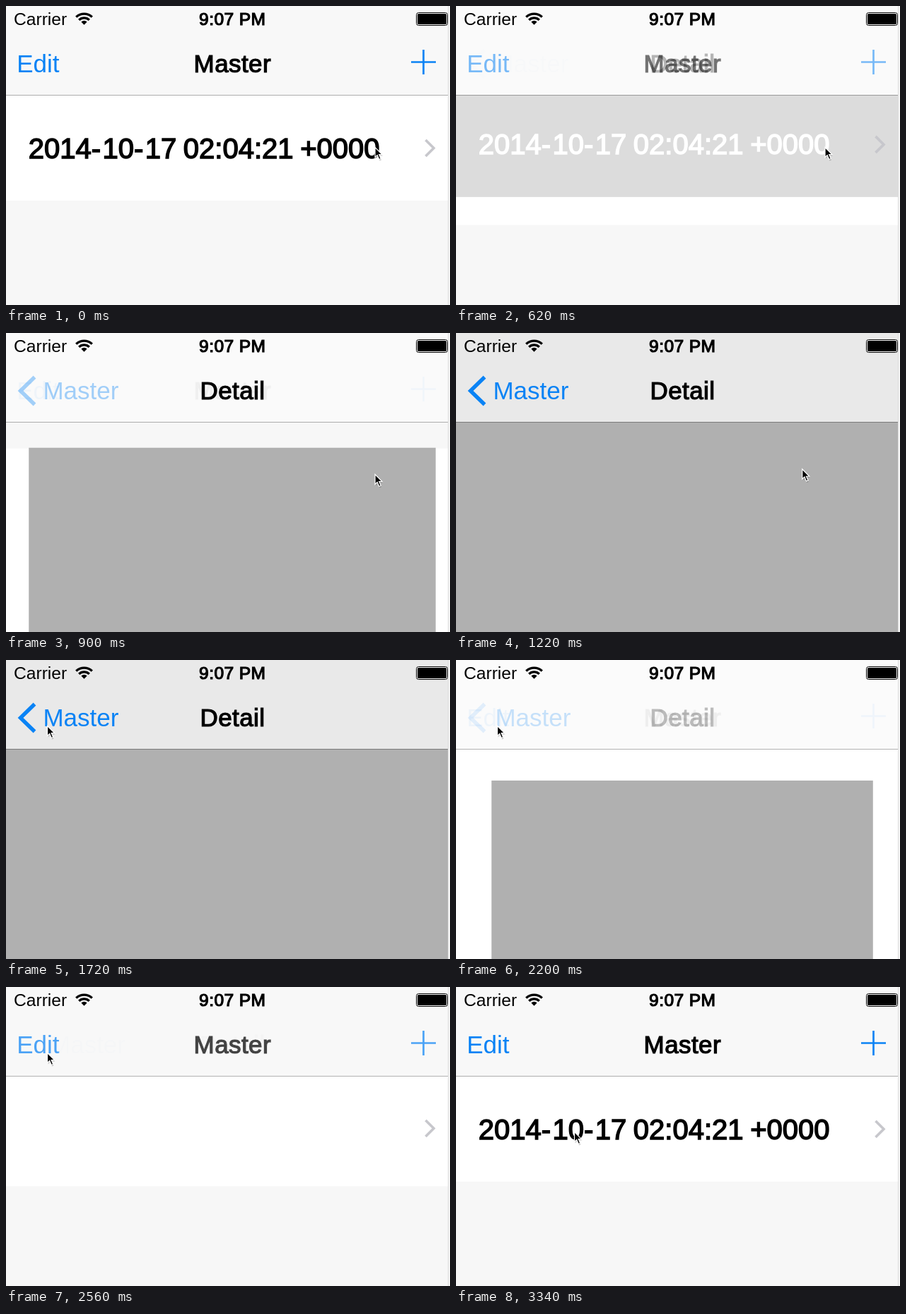
An HTML page that plays this animation: 628x424 px, repeating every 3.44 s.

```html
<!DOCTYPE html>
<html lang="en">
<head>
<meta charset="utf-8">
<title>Cell expand transition</title>
<style>
  html, body { margin: 0; width: 100%; height: 100%; overflow: hidden; background: #f7f7f7; }
  svg { display: block; width: 628px; height: 424px; }
  text { font-family: "Liberation Sans", Arial, sans-serif; white-space: pre; fill: currentColor; }
  /* Medium weight: regular outlines thickened a little */
  .medium { stroke: currentColor; stroke-width: 1.2px; letter-spacing: .4px; }
  .bar { font-size: 35px; }
  .status { font-size: 24.6px; }
  .stamp { font-size: 40px; letter-spacing: 0; word-spacing: -1.5px; stroke-width: 1.5px; }
  .dash { letter-spacing: 2.4px; }
  .mid { text-anchor: middle; }
  .blue { color: #0a83f5; }
  .line { fill: none; stroke: #0a83f5; }
</style>
</head>
<body>
<svg viewBox="0 0 628 424">
  <rect width="628" height="424" fill="#f7f7f7"/>

  <g id="master">
    <rect id="sheet" width="626" fill="#fff"/>
    <g id="cell">
      <rect id="cellBg" width="626" height="149"/>
      <text id="stamp" class="medium stamp" x="31.8" y="88.5">2014<tspan class="dash">-</tspan>10<tspan class="dash">-</tspan>17 02:04:21 +0000</text>
      <path d="M593.5 63 L605 74.5 L593.5 86" fill="none" stroke="#c7c7cc" stroke-width="3.6"/>
    </g>
  </g>
  <rect id="detail" fill="#b0b0b0"/>

  <rect id="nav" width="626" height="126"/>
  <rect y="126" width="626" height="1" fill="#000" opacity=".3"/>

  <text class="status" x="11" y="27">Carrier</text>
  <g fill="none" stroke="#000" stroke-width="3.2">
    <path d="M99.2 15.6 A16.3 16.3 0 0 1 121.8 15.6"/>
    <path d="M103.2 19.8 A10.4 10.4 0 0 1 117.8 19.8"/>
    <path d="M106.4 22.4 A5.8 5.8 0 0 1 114.6 22.4 L110.5 26.8 Z" fill="#000" stroke="none"/>
  </g>
  <text class="status medium mid" x="320.3" y="27" stroke-width=".9">9:07 PM</text>
  <rect x="580.5" y="9.5" width="44" height="18" rx="3" fill="#fff" stroke="#000"/>
  <rect x="582" y="11" width="41" height="15" rx="1.5"/>

  <g id="masterBar">
    <text class="bar blue" x="15.2" y="94">Edit</text>
    <path class="line" d="M573 79.5 H608 M590.5 62 V97" stroke-width="2.7"/>
  </g>
  <text id="masterTitle" class="bar medium mid" x="320.3" y="94">Master</text>
  <text id="detailTitle" class="bar medium mid" x="320.5" y="94">Detail</text>
  <path id="backArrow" class="line" d="M40.5 62.5 L20.5 82 L40.5 101.5" stroke-width="5.4"/>
  <text id="backLabel" class="bar blue" x="52.4" y="94">Master</text>

  <rect x="626" width="2" height="424" fill="#f6f6f6"/>
  <rect x="625" width="1" height="424" fill="#dcdcdc"/>

  <g id="cursor">
    <path d="M1 2 V16 L4 13 L6.500 19 L9 18 L6.500 12 H11 Z" opacity=".2"/>
    <path d="M0 0 V14 L3.200 11 L5.700 17 L8.200 16 L5.700 10.200 H10 Z" stroke="#fff" stroke-width="1.2"/>
  </g>
</svg>
<script>
  const LOOP = 3440;
  const PRESS = 320, TEXT_RESET = 2780, BACK_PRESS = 1840;
  const PUSH = { start: 557, zoom: 451, fade: 523 };
  const POP = { start: 2036, zoom: 560, fade: 600 };
  const SCREEN = { w: 640, h: 1136 };
  const CELL = { top: 127, h: 149 };

  const el = {};
  document.querySelectorAll("[id]").forEach(n => el[n.id] = n);

  const set = (node, attrs) => {
    for (const k in attrs) node.setAttribute(k, attrs[k]);
  };
  const clamp = x => Math.min(1, Math.max(0, x));
  const mix = (a, b, k) => a + (b - a) * k;
  const span = (t, from, length) => clamp((t - from) / length);
  const gray = v => `rgb(${[v, v, v].map(Math.round)})`;

  // Standard ease-in-out, cubic-bezier(.42, 0, .58, 1)
  function ease(x) {
    let lo = 0, hi = 1;
    for (let i = 0; i < 20; i++) {
      const s = (lo + hi) / 2, r = 1 - s;
      const bx = 3 * r * r * s * .42 + 3 * r * s * s * .58 + s * s * s;
      if (bx < x) lo = s; else hi = s;
    }
    return lo * lo * (3 - 2 * lo);
  }

  const fadeOut = u => u >= 1 ? 0 : Math.exp(-5 * u);
  const fadeIn = u => Math.pow(u, 2.4);

  function drawContent(t) {
    const popping = t >= POP.start;
    const pushed = t >= PUSH.start + PUSH.zoom && !popping;
    const p = popping ? 1 - ease(span(t, POP.start, POP.zoom))
                      : ease(span(t, PUSH.start, PUSH.zoom));
    const top = CELL.top * (1 - p);
    const height = mix(CELL.h, SCREEN.h, p);
    const selected = t >= PRESS && t < TEXT_RESET;

    set(el.master, { opacity: pushed ? 0 : 1 });
    set(el.sheet, { y: top, height });
    set(el.cell, { transform: `translate(0 ${top})` });
    set(el.cellBg, { fill: selected && !popping ? gray(mix(219, 251, p)) : "#fff" });
    set(el.stamp, { color: selected ? "#fff" : "#000" });

    // The detail fits the growing sheet, hung below the cell.
    const s = height / SCREEN.h;
    set(el.detail, pushed
      ? { x: 0, y: 0, width: 626, height: 424, opacity: 1 }
      : {
          x: SCREEN.w / 2 * (1 - s), y: top + CELL.h - 1,
          width: SCREEN.w * s, height: SCREEN.h * s,
          opacity: span(p, .06, .4)
        });

    let tone = 248;
    if (pushed) tone = 233;
    else if (popping) tone = mix(252, 248, span(t, POP.start, POP.zoom));
    else if (t >= PUSH.start) tone = 250;
    set(el.nav, { fill: gray(tone) });
  }

  function drawBar(t) {
    const popping = t >= POP.start;
    const u = popping ? span(t, POP.start, POP.fade) : span(t, PUSH.start, PUSH.fade);
    const masterAlpha = popping ? fadeIn(u) : fadeOut(u);
    const detailAlpha = popping ? fadeOut(u) : u && clamp(2 * u + .03);
    const held = mix(1, .42, span(t, BACK_PRESS, 60));
    const backAlpha = held * (popping ? (1 - u) ** 2 : fadeIn(u));

    set(el.masterBar, { opacity: masterAlpha });
    set(el.masterTitle, { opacity: masterAlpha });
    set(el.detailTitle, { opacity: detailAlpha });
    set(el.backLabel, {
      opacity: backAlpha,
      transform: `translate(${popping ? 11 * u : 0} 0)`
    });
    set(el.backArrow, { opacity: popping ? backAlpha * mix(1, .5, clamp(u * 4)) : backAlpha });
  }

  function drawCursor(t) {
    const a = ease(span(t, 1110, 600));
    const b = ease(span(t, 2970, 370));
    const x = mix(mix(522, 58.5, a), 167.5, b);
    const y = mix(mix(200.5, 93.5, a), 205.5, b);
    set(el.cursor, { transform: `translate(${x} ${y})` });
  }

  function draw(t) {
    drawContent(t);
    drawBar(t);
    drawCursor(t);
  }

  const begin = performance.now();
  function tick() {
    draw((performance.now() - begin) % LOOP);
    requestAnimationFrame(tick);
  }
  tick();
</script>
</body>
</html>
```
